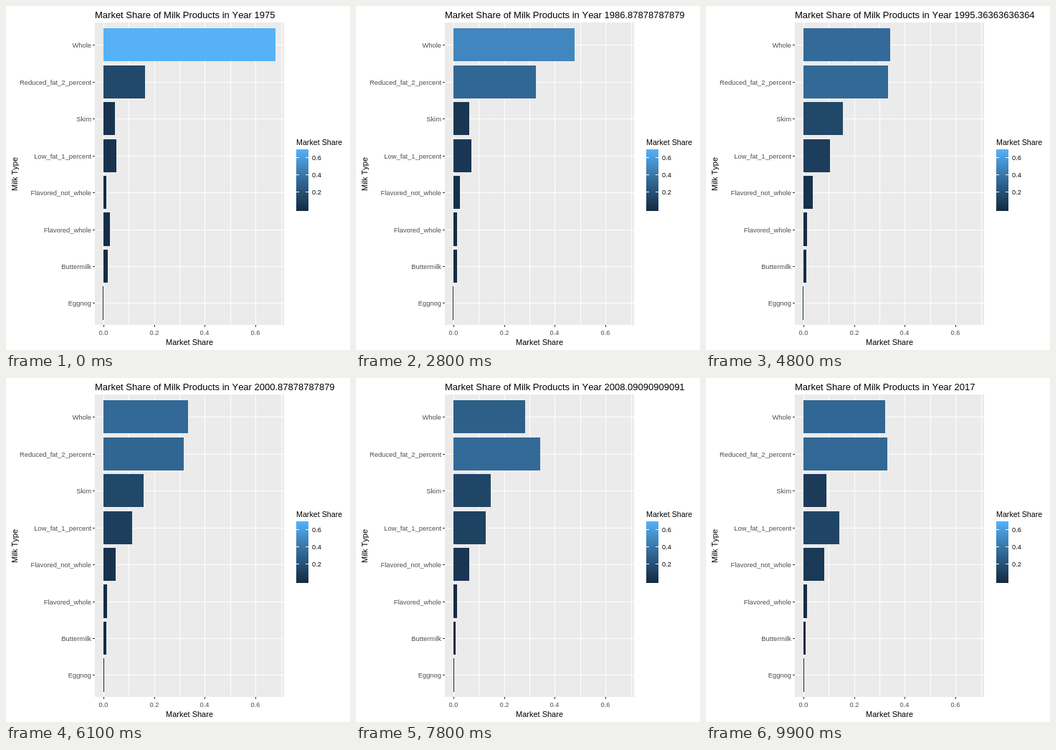
Animation of 480 by 480 pixels, one loop 10 s. Source, as an HTML page:

```html
<!DOCTYPE html>
<html lang="en">
<head>
<meta charset="utf-8">
<title>Milk market share</title>
<style>
  html, body { margin: 0; width: 100%; height: 100%; overflow: hidden; background: #fff; }
  svg { display: block; width: 480px; height: 480px; }
  text { font: 11px "Liberation Sans", Arial, sans-serif; font-kerning: none; }
  .title { font-size: 13px; }
  .legend { font-size: 10.7px; }
  .tick { font-size: 9.2px; }
  .grey { fill: #4d4d4d; }
  .name { font-size: 9.4px; fill: #4d4d4d; }
  rect { shape-rendering: crispEdges; }
</style>
</head>
<body>
<svg id="chart" viewBox="0 0 480 480"></svg>
<script>
const svg = document.getElementById('chart');
const PANEL = { left: 124, top: 23, right: 388, bottom: 445 };
const ZERO = 136, UNIT = 353.7, MAX_SHARE = 0.679;
const FIRST_ROW = 54.34, BAND = 51.44;
const STEPS = 100, STEP_MS = 100, FIRST_YEAR = 1975, LAST_YEAR = 2017;

// Turning points of each market share: [year, share]
const trends = {
  Whole: [[1975, 0.679], [1995, 0.342], [2001, 0.334], [2010, 0.27], [2017, 0.323]],
  Reduced_fat_2_percent: [[1975, 0.164], [1989, 0.353], [2001, 0.317], [2009, 0.344], [2017, 0.331]],
  Skim: [[1975, 0.045], [1986, 0.053], [1996, 0.163], [2009, 0.147], [2017, 0.0905]],
  Low_fat_1_percent: [[1975, 0.051], [1987, 0.071], [1996, 0.106], [2017, 0.1415]],
  Flavored_not_whole: [[1975, 0.011], [1996, 0.038], [2017, 0.082]],
  Flavored_whole: [[1975, 0.0257], [1981, 0.014], [2017, 0.013]],
  Buttermilk: [[1975, 0.018], [1996, 0.0115], [2017, 0.0085]],
  Eggnog: [[1975, 0.0012], [2017, 0.0016]]
};

function add(tag, attrs, text = '') {
  const el = document.createElementNS('http://www.w3.org/2000/svg', tag);
  for (const key in attrs) el.setAttribute(key, attrs[key]);
  el.textContent = text;
  return svg.appendChild(el);
}

const box = (x, y, width, height, fill) => add('rect', { x, y, width, height, fill });
const label = (x, y, text, cls = '', anchor = 'start') =>
  add('text', { x, y, class: cls, 'text-anchor': anchor }, text);
const mix = (a, b, p) => a + (b - a) * p;

// Navy to sky blue, bent slightly darker in the middle
function shade(p) {
  const bend = 4 * p * (1 - p);
  const rgb = [[19, 86, 2], [43, 177, 4], [67, 247, 5]]
    .map(([low, high, dip]) => Math.round(mix(low, high, p) - dip * bend));
  return `rgb(${rgb})`;
}

function shareAt(points, year) {
  const next = Math.max(1, points.findIndex(point => point[0] >= year));
  const [fromYear, from] = points[next - 1], [toYear, to] = points[next];
  return mix(from, to, (year - fromYear) / (toYear - fromYear));
}

const center = i => FIRST_ROW + BAND * i;
const width = PANEL.right - PANEL.left, height = PANEL.bottom - PANEL.top;

// Panel, grid and axes
box(PANEL.left, PANEL.top, width, height, '#ebebeb');
for (let i = 0; i < 8; i++) {
  const x = Math.round(ZERO + i * UNIT / 10);
  box(x, PANEL.top, 1, height, '#fff');
  if (i % 2 === 0) {
    box(x, PANEL.bottom, 1, 3, '#333');
    label(x, 459, (i / 10).toFixed(1), 'tick grey', 'middle');
  }
}
Object.keys(trends).forEach((name, i) => {
  const y = Math.round(center(i));
  box(PANEL.left, y, width, 1, '#fff');
  box(PANEL.left - 3, y, 3, 1, '#333');
  label(119, y + 4, name, 'name', 'end');
});
label(256, 473, 'Market Share', '', 'middle');
add('text', { transform: 'translate(16 234.5) rotate(-90)', 'text-anchor': 'middle' }, 'Milk Type');

// Legend
label(405, 194, 'Market Share', 'legend');
for (let i = 0; i < 86; i++) box(405, 200 + i, 17, 1, shade(1 - i / 85));
for (const value of [0.6, 0.4, 0.2]) {
  const y = Math.round(284.7 - value * 122);
  box(405, y - 1, 4, 1, '#fff');
  box(418, y - 1, 4, 1, '#fff');
  label(427, y + 3, value, 'tick');
}

const title = label(PANEL.left, 17, '', 'title');
const bars = Object.values(trends).map((points, i) => {
  const top = Math.round(center(i) - BAND * 0.45);
  const bottom = Math.round(center(i) + BAND * 0.45);
  return { points, rect: box(ZERO, top, 0, bottom - top, shade(0)) };
});

function draw(step) {
  const year = mix(FIRST_YEAR, LAST_YEAR, step / (STEPS - 1));
  title.textContent = 'Market Share of Milk Products in Year ' + Number(year.toPrecision(15));

  for (const { points, rect } of bars) {
    const share = shareAt(points, year);
    const end = Math.round(share * UNIT);
    const length = Math.max(1, end);
    rect.setAttribute('x', ZERO + end - length);
    rect.setAttribute('width', length);
    rect.setAttribute('fill', shade(share / MAX_SHARE));
  }
}

const start = performance.now();
function tick() {
  draw(Math.floor((performance.now() - start) / STEP_MS) % STEPS);
  requestAnimationFrame(tick);
}
tick();
</script>
</body>
</html>
```
